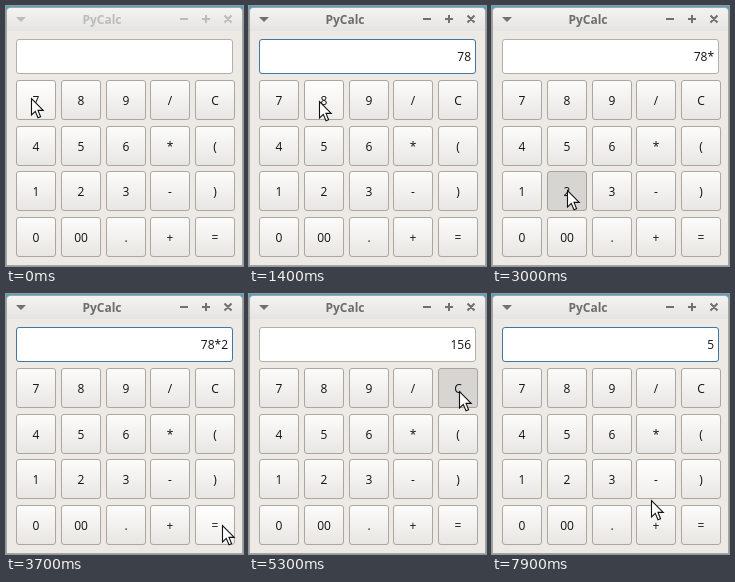
Write an HTML page that moves like this. It is 237 by 260 pixels and loops after 8000 ms.

```html
<!DOCTYPE html>
<html lang="en">
<head>
<meta charset="utf-8">
<title>PyCalc</title>
<style>
  html, body { margin: 0; width: 100%; height: 100%; overflow: hidden; background: #4aa3c4; }
  svg { display: block; width: 237px; height: 260px; }
  text { font: 12px "Open Sans", "Noto Sans", sans-serif; fill: #111; text-anchor: middle; }
  .title { font-weight: bold; }
  .bar text { fill: #6c6c6c; }
  .bar path { fill: none; stroke: #707070; stroke-width: 2; }
  .bar .menu { fill: #707070; stroke: none; }
  .inactive text { fill: #bbb; }
  .inactive path { stroke: #bcbcbc; }
  .inactive .menu { fill: #bcbcbc; }
  .key rect { fill: url(#face); stroke: #aaa7a2; }
  .key.hover rect { fill: url(#light); }
  .key.down rect { fill: #d6d5d2; stroke: #a5a29d; }
  #field { fill: #fff; stroke: #b3afa9; }
  #field.focus { stroke: #3f76a3; }
  #value { text-anchor: end; }
</style>
</head>
<body>
<svg viewBox="0 0 237 260">
  <defs>
    <linearGradient id="face" x2="0" y2="1">
      <stop stop-color="#fcfcfb"/><stop offset="1" stop-color="#e8e6e3"/>
    </linearGradient>
    <linearGradient id="light" x2="0" y2="1">
      <stop stop-color="#fff"/><stop offset="1" stop-color="#f0eeeb"/>
    </linearGradient>
    <linearGradient id="head" x2="0" y2="1">
      <stop stop-color="#f3f3f2"/><stop offset="1" stop-color="#e5e4e2"/>
    </linearGradient>
  </defs>
  <path d="M0 260V6Q0 1 5 1H232Q237 1 237 6V260Z" fill="#a3a5a5"/>
  <path d="M1 259V6Q1 2 5 2H232Q236 2 236 6V259Z" fill="#edeae5"/>
  <path d="M1 25V6Q1 2 5 2H232Q236 2 236 6V25Z" fill="url(#head)"/>
  <g class="bar" id="bar">
    <path class="menu" d="M10 11H20L15 16Z"/>
    <text class="title" x="96" y="18">PyCalc</text>
    <path d="M174 13H182M196 13H204M200 9V17M218.5 9.5L225.5 16.5M225.5 9.5L218.5 16.5"/>
  </g>
  <rect id="field" x="10.5" y="33.5" width="216" height="34" rx="2.5"/>
  <text id="value" x="222" y="55"></text>
  <g id="keys"></g>
  <path id="cursor" d="M.5 .5V17L4.3 13.4L7 19.8L9.6 18.7L7 12.4H12.2Z" fill="#fff" stroke="#111" stroke-width="1.1"/>
</svg>
<script>
const LOOP = 8000, STEP = 100;
const $ = id => document.getElementById(id);
const COLS = [10, 55, 100, 144, 189], ROWS = [74, 120, 165, 211], SIZE = 40;
const LABELS = [
  ["7", "8", "9", "/", "C"],
  ["4", "5", "6", "*", "("],
  ["1", "2", "3", "-", ")"],
  ["0", "00", ".", "+", "="]
];
// start, end, control point, destination
const START = [25, 92];
const MOVES = [
  [800, 1000, 48, 95, 70, 95],
  [1500, 2100, 105, 88, 160, 137],
  [2400, 2800, 110, 165, 75, 184],
  [3100, 3700, 150, 215, 216, 231],
  [4000, 4800, 223, 165, 210, 97],
  [5400, 6100, 110, 175, 75, 142],
  [6500, 7300, 120, 136, 170, 133],
  [7300, 7600, 158, 158, 151, 185],
  [7700, 7900, 154, 198, 159, 206]
];
const PRESSES = [[700, 800, "7"], [1200, 1400, "8"], [3000, 3100, "2"], [3800, 3900, "="], [5300, 5400, "C"]];
const VALUES = [[0, ""], [800, "7"], [1400, "78"], [2400, "78*"], [3100, "78*2"], [3900, "156"], [5400, ""], [6500, "5"]];

function add(parent, tag, attrs, text = "") {
  const el = document.createElementNS("http://www.w3.org/2000/svg", tag);
  for (const k in attrs) el.setAttribute(k, attrs[k]);
  el.textContent = text;
  return parent.appendChild(el);
}

const keys = LABELS.flatMap((row, r) => row.map((label, c) => {
  const x = COLS[c], y = ROWS[r], el = add($("keys"), "g", { class: "key" });
  add(el, "rect", { x: x + .5, y: y + .5, width: SIZE - 1, height: SIZE - 1, rx: 2.5 });
  add(el, "text", { x: x + SIZE / 2, y: y + 25 }, label);
  return { el, label, x, y };
}));

function cursorAt(t) {
  let [x, y] = START;
  for (const [t0, t1, cx, cy, ex, ey] of MOVES) {
    if (t <= t0) break;
    const p = Math.min(1, (t - t0) / (t1 - t0)), s = p * p * (3 - 2 * p);
    const mix = (a, b, c) => a * (1 - s) ** 2 + 2 * b * s * (1 - s) + c * s * s;
    [x, y] = [mix(x, cx, ex), mix(y, cy, ey)];
  }
  return [Math.round(x), Math.round(y)];
}

function draw(t) {
  const [x, y] = cursorAt(t);
  const press = PRESSES.find(([a, b]) => t >= a && t < b);
  $("cursor").setAttribute("transform", `translate(${x} ${y})`);
  $("bar").classList.toggle("inactive", t < 700);
  $("field").classList.toggle("focus", t >= 800 && !press);
  $("value").textContent = VALUES.findLast(v => v[0] <= t)[1];
  for (const k of keys) {
    const over = x >= k.x && x <= k.x + SIZE && y >= k.y && y <= k.y + SIZE + 1;
    k.el.classList.toggle("hover", over);
    k.el.classList.toggle("down", !!press && press[2] === k.label);
  }
}

const begin = performance.now();
function tick() {
  const t = (performance.now() - begin) % LOOP;
  draw(Math.floor(t / STEP) * STEP);
  requestAnimationFrame(tick);
}
tick();
</script>
</body>
</html>
```
